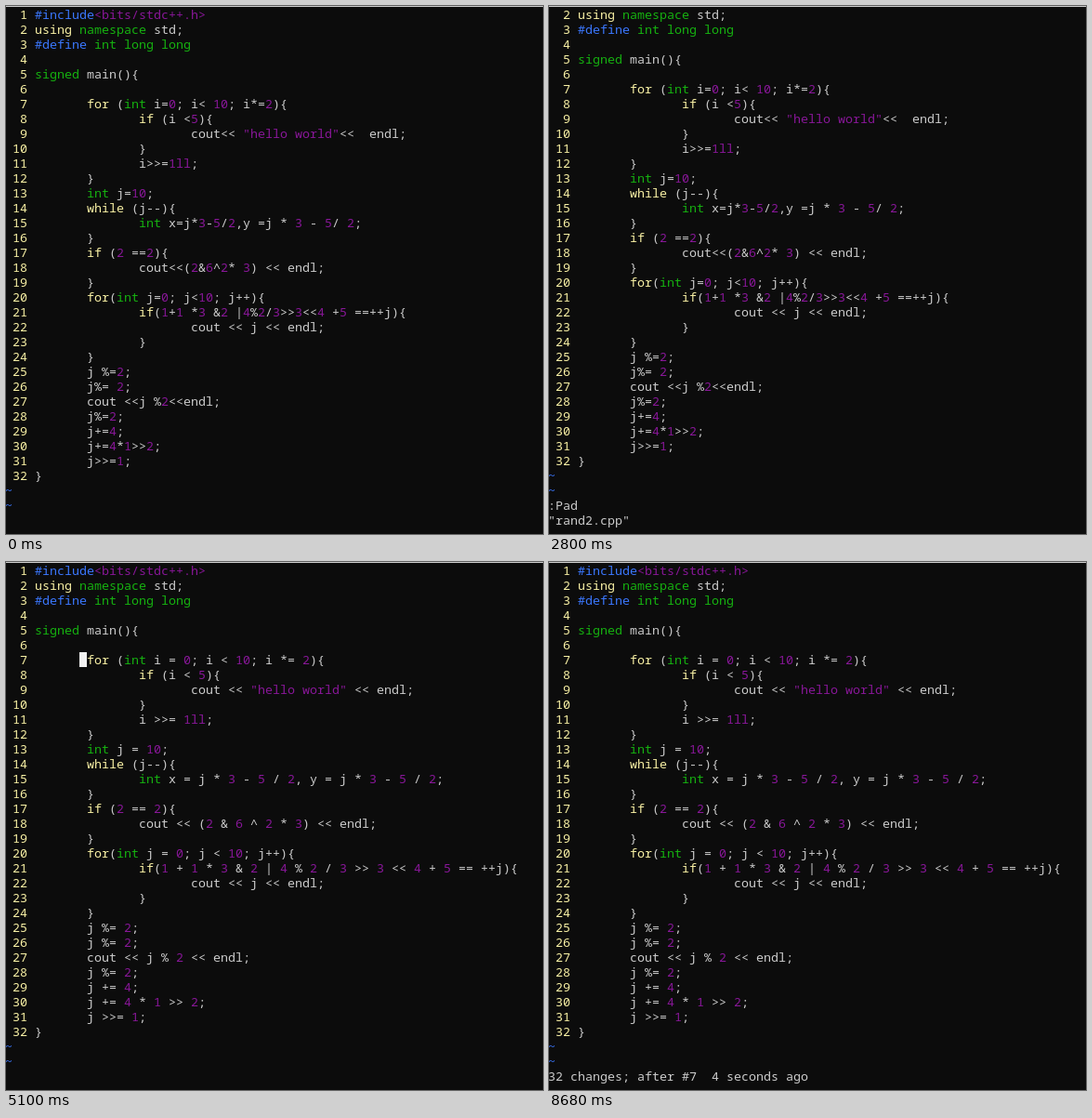
An HTML page for the animation above (9.26 s loop, 578 by 568 pixels).

```html
<!DOCTYPE html>
<html lang="en">
<head>
<meta charset="utf-8">
<title>Code formatting in a terminal editor</title>
<style>
html, body { margin: 0; width: 100%; height: 100%; overflow: hidden; background: #0c0c0c; }
svg { display: block; width: 578px; height: 568px; }
text { font: 13.333px "Noto Sans Mono", "DejaVu Sans Mono", monospace; white-space: pre; font-variant-ligatures: none; }
</style>
</head>
<body>
<svg viewBox="0 0 578 568">
  <rect width="578" height="568" fill="#0c0c0c"/>
  <rect width="578" height="1" fill="#cccccc"/>
  <g id="screen"></g>
  <rect id="cursor" width="8" fill="#f2f2f2"/>
</svg>
<script>
const LOOP = 9260, CW = 8, CH = 16, LAST = 34;
const C = { text: '#cccccc', key: '#f9f1a5', type: '#16b210', pre: '#3b78ff', lit: '#881798' };

// Each leading ">" is one tab, seven cells wide.
const messy = `#include<bits/stdc++.h>
using namespace std;
#define int long long

signed main(){

>for (int i=0; i< 10; i*=2){
>>if (i <5){
>>>cout<< "hello world"<<  endl;
>>}
>>i>>=1ll;
>}
>int j=10;
>while (j--){
>>int x=j*3-5/2,y =j * 3 - 5/ 2;
>}
>if (2 ==2){
>>cout<<(2&6^2* 3) << endl;
>}
>for(int j=0; j<10; j++){
>>if(1+1 *3 &2 |4%2/3>>3<<4 +5 ==++j){
>>>cout << j << endl;
>>}
>}
>j %=2;
>j%= 2;
>cout <<j %2<<endl;
>j%=2;
>j+=4;
>j+=4*1>>2;
>j>>=1;
}`.split('\n').map(s => s.replace(/^>+/, m => ' '.repeat(7 * m.length)));

const tidy = messy.map(s => s[0] === '#' ? s :
  s.replace(/\+\+|--|\s*(>>=|<<|>>|[*+%]=|==|[-+*\/%&|^<=])\s*/g, (m, op) => op ? ` ${op} ` : m)
   .replace(/,\s*/g, ', '));

function colorOf(tok) {
  if (/^("|<bits|\d)/.test(tok)) return C.lit;
  if (tok[0] === '#') return C.pre;
  if (/^(int|long|signed|namespace)$/.test(tok)) return C.type;
  if (/^(for|if|while|using)$/.test(tok)) return C.key;
  return C.text;
}

const esc = s => s.replace(/&/g, '&amp;').replace(/</g, '&lt;');
const put = (s, col, row, fill) =>
  `<text x="${col * CW - 1}" y="${row * CH + 14}" fill="${fill}">${esc(s)}</text>`;

function codeLine(s, row) {
  let out = '';
  for (const m of s.matchAll(/"[^"]*"|<bits.*>|#\w+|\w+|[^\s\w]+/g))
    out += put(m[0], 4 + m.index, row, colorOf(m[0]));
  return out;
}

// Bottom lines push the code upward when there is more than one.
function screen(lines, bottom, tildes = true) {
  const up = bottom.length - 1;
  let out = '';
  lines.forEach((s, i) => {
    if (i < up) return;
    out += put(String(i + 1).padStart(3), 0, i - up, C.key) + codeLine(s, i - up);
  });
  if (tildes) for (const r of [32, 33]) out += put('~', 0, r - up, C.pre);
  bottom.forEach((s, i) => {
    out += put(s, 0, LAST - up + i, s.startsWith('Press') ? C.type : C.text);
  });
  return out;
}

const prompt = [':Pad', '"rand2.cpp" 32L, 547B', 'Press ENTER or type command to continue'];
const undone = '32 changes; before #7  3 seconds ago';
const redone = '32 changes; after #7  4 seconds ago';

const views = [
  [0, screen(messy, [''])],
  [1570, screen(messy, [':'])],
  [1860, screen(messy, [':P'])],
  [2000, screen(messy, [':Pa'])],
  [2190, screen(messy, [':Pad'])],
  [2800, screen(messy, [':Pad', '"rand2.cpp"'])],
  [2820, screen(messy, prompt)],
  [3920, screen(tidy, [''], false)],
  [3940, screen(tidy, [''])],
  [5390, screen(messy, [undone])],
  [6410, screen(tidy, [undone])],
  [6430, screen(tidy, [redone])]
];

// Cursor: time, column, row, height (0 = hidden)
const home = (t, on) => [t, 10, 6, on ? CH : 0];
const cmd = (t, col, h) => [t, col, LAST, h];
const cursors = [
  home(0, 0), home(970, 1), home(1470, 0),
  cmd(1840, 1, 4), cmd(1860, 2, CH), cmd(2000, 3, 4), cmd(2020, 3, CH),
  cmd(2190, 4, 4), cmd(2210, 4, CH), cmd(2520, 4, 0),
  cmd(2820, 39, CH), cmd(3050, 39, 0), cmd(3550, 39, CH), cmd(3890, 39, 0),
  home(4070, 1), home(4580, 0), home(5100, 1), home(5620, 0), home(6140, 1),
  home(6410, 0), home(6430, 1), home(6640, 0), home(7160, 1), home(7660, 0),
  home(8170, 1), home(8680, 0)
];

const at = (list, t) => list.findLast(e => e[0] <= t);
const screenEl = document.getElementById('screen');
const cursorEl = document.getElementById('cursor');
let shown = null;

function draw(t) {
  const view = at(views, t);
  if (view !== shown) {
    screenEl.innerHTML = view[1];
    shown = view;
  }
  const [, col, row, h] = at(cursors, t);
  cursorEl.setAttribute('x', col * CW - 1);
  cursorEl.setAttribute('y', 1 + (row + 1) * CH - h);
  cursorEl.setAttribute('height', h);
}

const start = performance.now();
function tick() {
  draw((performance.now() - start) % LOOP);
  requestAnimationFrame(tick);
}
tick();
</script>
</body>
</html>
```
